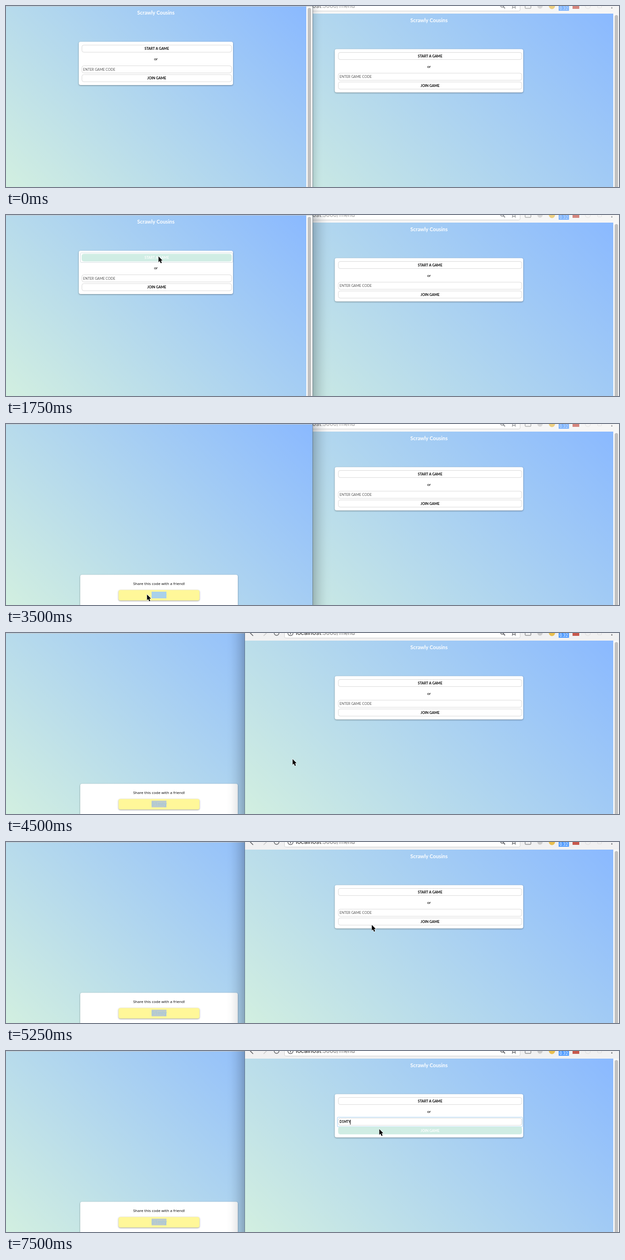
These frames come from a looping animation (1280x380 px, 8 s). An HTML page with a canvas:

```html
<!DOCTYPE html>
<html lang="en">
<head>
<meta charset="utf-8">
<title>Game lobby in two windows</title>
<style>
  html, body { margin: 0; width: 100%; height: 100%; overflow: hidden; }
  canvas { display: block; }
</style>
</head>
<body>
<canvas id="stage" width="1280" height="380"></canvas>
<script>
const c = document.getElementById('stage').getContext('2d');
const TICK = 250, LOOP = 8000, TITLE = 'Scrawly Cousins';
const MINT = '#d0ede4', PALE = '#a9d1ea', LINE = '#dadada', INK = '#606266';

// Moments of the story, counted in ticks
const ENTER = 1, FOCUS = 5, PRESS = 6, SHARE = 8, DRAG = 10, DRAGGED = 14,
      RAISE = 18, FIELD = 22, PASTE = 26, JOIN = 27;

// Each move ends at a resting place of the pointer
const moves = [
  { from: ENTER, to: FOCUS, x: 318, y: 87 },
  { from: SHARE, to: DRAG, x: 361, y: 351 },
  { from: DRAG, to: DRAGGED, x: 294, y: 358 },
  { from: 16, to: 19, x: 750, y: 218 },
  { from: 19, to: FIELD, x: 770, y: 152 },
  { from: 25, to: 28, x: 779, y: 164 }
];

function pointerAt(k) {
  let x = 430, y = 300;
  for (const m of moves) {
    const p = Math.min(1, Math.max(0, (k - m.from) / (m.to - m.from)));
    x += (m.x - x) * p;
    y += (m.y - y) * p;
  }
  return { x, y };
}

function rect(x, y, w, h, fill) {
  c.fillStyle = fill;
  c.fillRect(x, y, w, h);
}

function paint(fill, line, width = 1) {
  if (fill) { c.fillStyle = fill; c.fill(); }
  if (line) { c.strokeStyle = line; c.lineWidth = width; c.stroke(); }
}

function box(x, y, w, h, r, fill, line) {
  c.beginPath();
  c.roundRect(x, y, w, h, r);
  paint(fill, line);
}

function disc(x, y, r, fill, line) {
  c.beginPath();
  c.arc(x, y, r, 0, 7);
  paint(fill, line, 1.4);
}

function shape(points, fill, line, width) {
  c.beginPath();
  points.forEach(p => c.lineTo(...p));
  if (fill) c.closePath();
  paint(fill, line, width);
}

function raised(x, y, w, h, fill) {
  c.save();
  c.shadowColor = 'rgba(0,0,0,.4)';
  c.shadowBlur = 3;
  c.shadowOffsetY = 1;
  box(x, y, w, h, 4, fill);
  c.restore();
}

function text(s, x, y, font, color, align = 'center') {
  c.font = font + ', sans-serif';
  c.fillStyle = color;
  c.textAlign = align;
  c.fillText(s, x, y);
}

// 45 degree page background, mint at bottom left, blue at top right
function page(x, y, w, h) {
  const d = (w + h) / 4, mx = x + w / 2, my = y + h / 2;
  const g = c.createLinearGradient(mx - d, my + d, mx + d, my - d);
  g.addColorStop(0, '#d2efe0');
  g.addColorStop(1, '#8ab9ff');
  rect(x, y, w, h, g);
}

// Window shadow with a quadratic falloff, then the window's edge line
function edge(x, dir, active) {
  const reach = dir * (active ? 40 : 22), g = c.createLinearGradient(x, 0, x + reach, 0);
  for (let i = 0; i <= 1; i += .25)
    g.addColorStop(i, `rgba(30,40,50,${(active ? .28 : .16) * (1 - i) ** 2})`);
  rect(x, 0, reach, 380, g);
  rect(x, 0, dir, 380, 'rgba(70,85,95,.55)');
}

function scrollbar(x, y, w) {
  rect(x, y, w, 380 - y, '#f8f8f8');
  box(x + 3, y + 3, 7, 400, 3.5, '#c1c1c1');
}

function button(label, x, y, w, hover) {
  box(x + .5, y + .5, w - 1, 15, 4, hover ? MINT : '#fff', hover ? MINT : LINE);
  text(label, x + w / 2, y + 10.6, '700 7.2px Lato', hover ? '#fff' : '#000');
}

function menu(x, y, w, pad, s) {
  const bx = x + pad, bw = w - pad - 2.5, mid = x + w / 2;
  text(TITLE, mid, y - 57, '700 10.8px Lato', '#fff');
  raised(x, y, w, 91, '#fff');
  button('START A GAME', bx, y + 6.5, bw, s.start);
  if (s.startRing) box(x + 3.5, y + 4.5, w - 4, 20, 1, null, '#d5dfe2');
  text('or', mid, y + 39, '500 8px Lato', '#000');
  box(bx + .5, y + 50.5, bw - 1, 15, 4, '#fff', LINE);
  if (s.field) box(x + 5.5, y + 48.5, w - 7, 20, 1, null, '#a5d2f5');
  if (s.code) text(s.code, bx + 3, y + 60.8, '700 6.5px Lato', '#000', 'left');
  else text('ENTER GAME CODE', bx + 3, y + 60.8, '7.2px Lato', '#555', 'left');
  if (s.caret) rect(bx + (s.code ? 25 : 2.5), y + 54, 1, 10, '#000');
  button('JOIN GAME', bx, y + 68.5, bw, s.join);
}

function share(k, active) {
  raised(155, 316.5, 329, 80, '#fff');
  text('Share this code with a friend!', 319.5, 337.5, '8px "Open Sans"', '#000');
  raised(235, 348.5, 169, 22, '#fff799');
  const code = color => text('D1mty', 319.5, 363, '700 9.8px "Open Sans"', color);
  code(PALE);
  if (k < DRAG) return;
  const start = k > DRAGGED ? 304 : Math.min(335, Math.max(304, pointerAt(k).x));
  rect(start, 352, 335 - start, 14, active ? PALE : '#bccbcd');
  if (!active) code('#a9c8d6');
}

function leftWindow(k) {
  const active = k >= FOCUS && k < RAISE, lobby = k >= SHARE;
  edge(640, 1, active);
  page(0, 1, lobby ? 640 : 627, 379);
  rect(0, 0, 640, 1, '#c6c9cb');
  if (lobby) {
    share(k, active);
  } else {
    menu(152, 75, 322, 6, { start: k >= FOCUS, startRing: k >= PRESS });
    scrollbar(627, 1, 13);
  }
}

function arrow(x, dir, color) {
  shape([[x, -6], [x - 6 * dir, 0], [x, 6]], null, color, 1.6);
}

function toolbar(active) {
  rect(499, 0, 781, 16, active ? '#f1f1f2' : '#f6f6f6');
  box(581.5, -14.5, 492, 25, 3, '#fff', '#d0d0d0');
  c.save();
  c.globalAlpha = active ? 1 : .7;
  arrow(516, 1, INK);
  arrow(538, -1, '#ccc');
  disc(565, 0, 5, null, INK);
  disc(594, 0, 5.5, null, INK);
  rect(593.3, -1, 1.5, 4, INK);
  text('localhost', 605, 4, '13px Roboto', '#222', 'left');
  text(':3000/menu', 605 + c.measureText('localhost').width, 4, '13px Roboto', '#777', 'left');

  disc(1036, -1, 3.5, null, INK);
  shape([[1038.5, 1.5], [1042, 5]], null, INK, 1.8);
  const star = Array.from({ length: 11 }, (_, i) => {
    const r = i % 2 ? 2.4 : 5.5, a = i * Math.PI / 5;
    return [1060.5 + r * Math.sin(a), -r * Math.cos(a)];
  });
  shape(star, null, INK, 1.2);
  box(1084, -4, 12, 9, 1, null, INK);

  // Extension icons
  disc(1115, 0, 5.5, '#ccc');
  disc(1140, 0, 6.5, '#e9bf4e');
  rect(1154, 0, 21.5, 10, '#4a98ff');
  text('0.32', 1164.7, 8.3, '9px Roboto', '#fff');
  rect(1183, -5, 14, 11, '#c8584c');
  disc(1215, 0, 5.5, null, '#e3e3e3');
  box(1235.5, -5, 8, 9, 1, null, '#ddd');
  for (const y of [-1, 4]) disc(1265, y, 1.3, INK);
  c.restore();
}

function rightWindow(k) {
  const active = k >= RAISE;
  if (active) edge(499, -1, true);
  page(499, 16, 769, 364);
  toolbar(active);
  menu(686.5, 90.5, 393.5, 7, {
    field: k >= FIELD,
    caret: k >= FIELD && (k >= PASTE || k < FIELD + 2),
    code: k >= PASTE ? 'D1MTY' : '',
    join: k >= JOIN
  });
  scrollbar(1268, 16, 12);
}

function pointer(k) {
  if (k < ENTER) return;
  const { x, y } = pointerAt(k);
  c.save();
  c.translate(x, y);
  if (k >= FIELD && k < PASTE) {
    rect(0, -6, 1, 12, '#333');
    for (const end of [-7, 6]) rect(-2, end, 5, 1, '#333');
  } else {
    c.scale(.95, .95);
    c.lineJoin = 'round';
    const arrowhead = [[.5, 0], [.5, 12.5], [3.3, 10], [5.3, 15], [7.7, 14], [5.6, 9.2], [9.2, 9]];
    shape(arrowhead, '#fff', '#fff', 1.5);
    shape(arrowhead, '#000');
  }
  c.restore();
}

function draw(now) {
  const k = Math.floor(now % LOOP / TICK);
  const stack = [rightWindow, leftWindow];
  if (k >= RAISE) stack.reverse();
  stack.forEach(show => show(k));
  pointer(k);
}

let begin;
function loop(now) {
  begin ??= now;
  draw(now - begin);
  requestAnimationFrame(loop);
}
requestAnimationFrame(loop);
</script>
</body>
</html>
```
